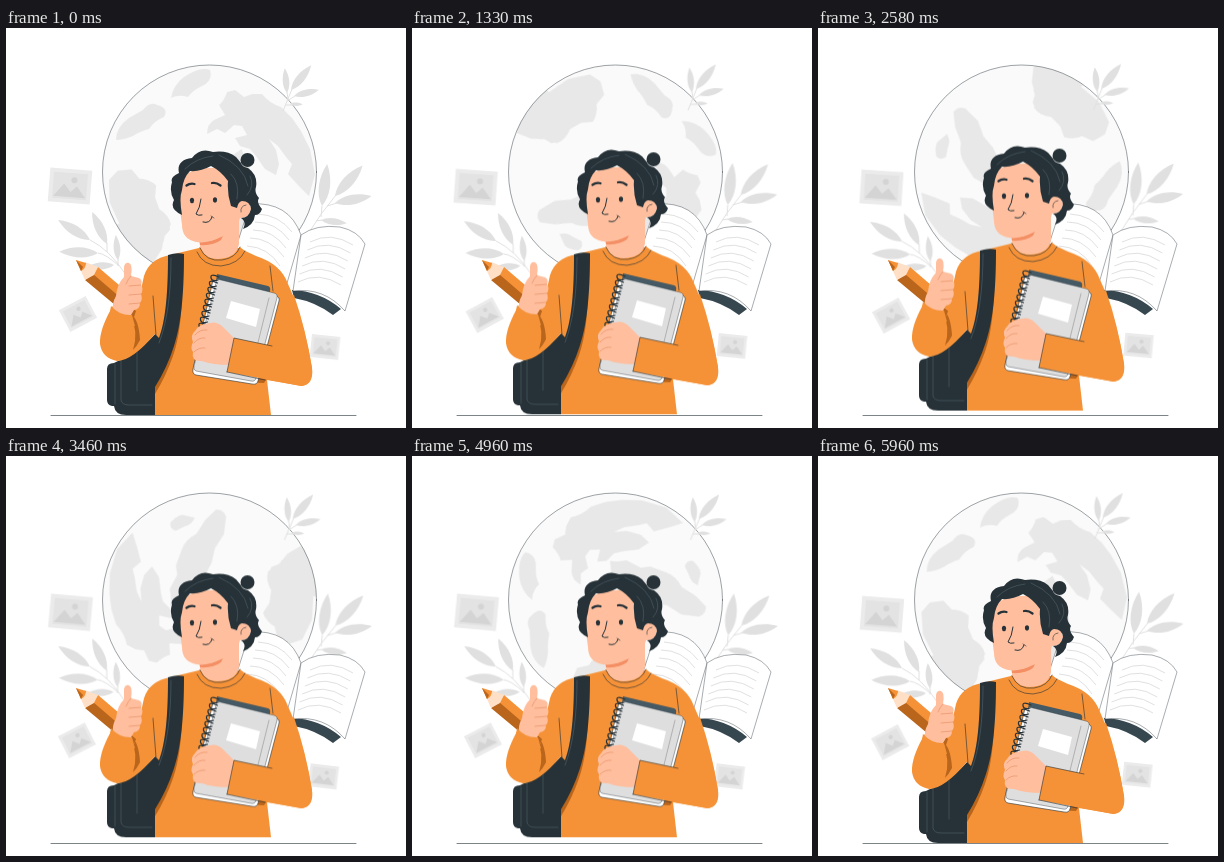
Animation, 400 px wide and 400 px high, one loop 6000 ms. Source, as an HTML page without scripts:

```html
<!DOCTYPE html>
<html lang="en">
<head>
<meta charset="utf-8">
<title>Student and globe</title>
<style>
html, body { margin: 0; width: 100%; height: 100%; overflow: hidden; background: #fff; }
svg { display: block; width: 100%; height: 100%; }
.bob { animation: bob .75s -.02s cubic-bezier(.37, 0, .63, 1) infinite alternate; }
.sway { transform-origin: 200px 200px; animation: sway .75s -.375s cubic-bezier(.37, 0, .63, 1) infinite alternate; }
.spin { transform-origin: 203.5px 144px; animation: spin 6s linear infinite; }
@keyframes bob { to { transform: translateY(-8px); } }
@keyframes sway { from { transform: rotate(-.75deg); } to { transform: rotate(.75deg); } }
@keyframes spin { to { transform: rotate(360deg); } }
.land { fill: #e8e8e8; }
.leaf { fill: #e0e0e0; }
.dark { fill: #263238; }
.knit { fill: #f59237; }
.shade { fill: #b9651c; }
.skin { fill: #ffbf9e; }
.line { fill: none; stroke: #263238; stroke-width: .6; stroke-linecap: round; stroke-linejoin: round; }
.pale { stroke: #52626a; }
.soft { fill: none; stroke: #e0e0e0; }
.text { fill: none; stroke: #d8d8d8; stroke-width: .8; }
</style>
</head>
<body>
<svg viewBox="0 0 400 400">
<defs>
  <path id="leaf" d="M0 0C-7-10-7-26 0-40C7-26 7-11 0 0Z"/>
  <g id="photo">
    <path fill="#ebebeb" d="M-21-17h42v34h-42z"/>
    <path fill="#e3e3e3" d="M-17-13h34v26h-34z"/>
    <path fill="#d4d4d4" d="M-16 11L-6-2L1 6L7 0L16 11Z"/>
    <circle cx="4" cy="-6" r="3" fill="#d4d4d4"/>
  </g>
  <path id="ring" d="M4 0Q-5-4-4 1Q-3 5 3 3"/>
  <clipPath id="disc"><circle cx="203.5" cy="144" r="107"/></clipPath>
</defs>

<!-- globe -->
<circle cx="203.5" cy="144" r="107" fill="#fafafa"/>
<g clip-path="url(#disc)">
  <g class="spin land">
    <path d="M110 112Q110 99 123 90L137 82Q144 73 151 77Q163 80 158 89Q148 93 143 101Q133 104 127 108Q118 112 110 112Z"/>
    <path d="M165 70Q167 57 178 49Q194 38 204 42Q207 53 196 58Q187 62 182 69Q173 66 165 70Z"/>
    <path d="M201 106Q201 96 208 92L219 87L213 77Q218 73 221 64L229 62L238 69L246 66L256 66Q263 75 275 79L286 90L295 103L304 121L309 146L303 168L292 157L282 146L286 136L280 129L272 118L263 111L270 122L273 136L270 147L259 141L250 128L244 121L234 118L229 110L241 107L236 98L228 97L219 105L211 101Z"/>
    <path d="M108 199Q115 192 124 197L136 193Q150 188 163 191L164 202L158 209L156 221L148 234L130 232L114 214Z"/>
    <g transform="rotate(-154.8 203.5 144)">
      <path d="M219 48Q213 60 217 67L216 80Q222 88 233 89L242 98L246 109Q256 112 264 108L275 113L287 106L291 94L281 74L262 58L250 46Z"/>
      <path d="M118 128Q116 115 122 112L129 106Q133 113 130 119L128 129Q122 133 118 128Z"/>
    </g>
    <path transform="rotate(-247.8 203.5 144)" d="M170 123Q176 118 180 110L195 104L200 96L214 88Q224 82 236 85L252 80L267 79Q273 84 270 91L257 103L241 108L229 117L212 124L199 136L185 133Z"/>
  </g>
</g>
<circle cx="203.5" cy="144" r="107" class="line" style="stroke-width:.45"/>

<!-- leaves and photos -->
<g class="sway">
  <g class="leaf">
    <path class="soft" d="M120 247Q103 221 84 212M113 238Q100 226 92 225M112 238V231M101 224V215"/>
    <use href="#leaf" transform="translate(84 212) rotate(-58) scale(.94)"/>
    <use href="#leaf" transform="translate(101 216) rotate(-25) scale(.88)"/>
    <use href="#leaf" transform="translate(112 232) rotate(-5) scale(.63)"/>
    <use href="#leaf" transform="translate(92 225) rotate(-88) scale(.97)"/>
    <use href="#leaf" transform="translate(108 237) rotate(-94) scale(.67)"/>
    <path class="soft" d="M302 206Q314 186 330 167M316 178L315 189M310 193L316 192M321 178L331 175"/>
    <use href="#leaf" transform="translate(316 178) rotate(7) scale(1.06)"/>
    <use href="#leaf" transform="translate(329 168) rotate(42) scale(1.03)"/>
    <use href="#leaf" transform="translate(329 175) rotate(79) scale(.93)"/>
    <use href="#leaf" transform="translate(315 192) rotate(97) scale(.65)"/>
    <path class="soft" d="M277 83L286 61M281 64L282 71M281 73L289 68M279 77H286"/>
    <use href="#leaf" transform="translate(281 65) rotate(-5) scale(.62)"/>
    <use href="#leaf" transform="translate(285 62) rotate(39) scale(.8)"/>
    <use href="#leaf" transform="translate(288 68) rotate(76) scale(.64)"/>
    <use href="#leaf" transform="translate(284 76) rotate(92) scale(.32)"/>
  </g>
  <use href="#photo" transform="translate(64 158) rotate(4.5)"/>
  <use href="#photo" transform="translate(72 286) rotate(-28) scale(.72)"/>
  <use href="#photo" transform="translate(319 319) rotate(6) scale(.68)"/>
</g>

<!-- open book -->
<path fill="#37474f" d="M286 262Q314 263 335 281L327 287Q310 274 288 270Z"/>
<g fill="#fff" stroke="#263238" stroke-width=".4">
  <path d="M244 176Q283 173 295 207L279 262Q262 232 226 232Z"/>
  <path d="M295 207Q310 196 334 199Q352 203 359 216L339 283Q318 259 287 263Z"/>
</g>
<g class="text">
  <path d="M252 186Q273 187 286 204M249 194Q270 194 283 212M247 202Q267 202 280 220M244 210Q264 210 278 229M241 218Q262 219 274 238"/>
  <path id="row" d="M304 214Q325 203 347 217"/>
  <use href="#row" x="-2.6" y="8"/>
  <use href="#row" x="-5.2" y="16"/>
  <use href="#row" x="-7.8" y="24"/>
  <use href="#row" x="-10.4" y="32"/>
  <use href="#row" x="-12" y="40"/>
</g>
<path class="line" d="M45 387.500H350"/>

<g class="bob">
  <!-- backpack -->
  <path class="dark" d="M112 333Q130 327 152 303V387H120Q109 387 108 378H106Q101 377 101 372V341Q101 335 108 335Z"/>
  <path class="line pale" d="M109 336V376M115 332V372Q116 377 123 377H146M131 323V363"/>

  <!-- sweater -->
  <path class="knit" d="M164 227Q143 231 138 248L132 275L108 276Q93 301 94 316Q96 330 111 333Q126 333 149 306V387H265L261 352L296 358Q308 356 306 340Q297 288 282 256Q275 236 250 228L233 220H193Z"/>
  <path class="shade" d="M124 285Q133 291 134 312Q131 318 127 322Q133 304 124 285Z"/>
  <path class="line" d="M147 268L150 307"/>
  <path class="shade" d="M176 260Q176 302 167 328Q160 348 149 366V350L165 315Z"/>
  <path class="dark" d="M162 227Q171 224 178 226C178 268 175 297 168 318Q161 340 149 359V306L153 310C160 292 162 262 162 227Z"/>
  <path class="line pale" d="M165 230Q165 285 153 315"/>

  <!-- neck and collar -->
  <path class="skin" d="M194 205L233 190V216Q231 230 212 231Q196 231 194 220Z"/>
  <path fill="#f48e64" d="M193 211Q205 218 219 204L215 212Q207 218 194 217Z"/>
  <path class="knit" d="M190 224L194 219Q200 233 216 231Q230 229 234 219L239 223Q234 236 215 238Q196 238 190 224Z"/>
  <path class="line" d="M191 224Q197 238 215 238Q233 236 239 223M194 220Q200 234 216 232Q230 230 234 219"/>

  <!-- head -->
  <path class="skin" d="M174 152Q186 136 225 141L234 171Q244 171 245 181Q244 190 234 190Q231 203 215 209Q201 216 190 214Q176 211 176 197L174 182Z"/>
  <path class="dark" d="M166 154Q164 149 173 145Q170 132 186 130Q194 119 207 124Q221 122 230 129L235 135Q236 139 242 140Q252 147 250 159Q248 164 253 170Q250 174 256 181Q254 187 249 187Q248 197 237 201Q241 194 235 190Q243 190 245 181Q244 173 236 173Q232 174 231 180L225 178Q221 166 222 153Q215 143 205 138Q194 144 184 143Q177 150 176 162Q173 170 176 187Q163 181 168 172Q163 164 166 154Z"/>
  <circle cx="241.500" cy="132" r="7" class="dark"/>
  <path class="line pale" d="M179 141Q190 130 207 128M213 127Q238 138 242 158M225 146Q234 155 231 171M244 148Q249 158 241 167"/>
  <path class="line" d="M240 177Q234 178 235 184"/>
  <g class="dark">
    <ellipse cx="186" cy="172.500" rx="2.1" ry="2.7"/>
    <ellipse cx="209" cy="172" rx="2.1" ry="2.7"/>
  </g>
  <path class="line" style="stroke-width:2.3" d="M180.500 157.500Q184 155 188.500 156M206 155Q210 154 214.500 157.500"/>
  <path class="line" style="stroke-width:1" d="M195 171Q194 180 190 186Q192 188 196 187M197 194Q204 196 206 189"/>
  <path class="line" d="M205 188L208 190"/>

  <!-- notebook -->
  <path fill="#455a64" d="M211 246L262 258Q265 259 264 263L249 345L198 337Z"/>
  <path class="shade" d="M186 341L250 350L265 320L277 325L258 355L234 354Z"/>
  <path fill="#fff" stroke="#263238" stroke-width=".6" d="M207 252L270 268Q274 269 273 273L252 353Q251 357 246 356L190 347Q186 346 187 341Z"/>
  <path fill="#dedede" stroke="#263238" stroke-width=".4" d="M211 251L268 265Q272 266 271 270L250 350Q249 354 245 353L190 343Q187 342 188 338Z"/>
  <path fill="#fff" d="M225 273L254 281L250 299L220 290Z"/>
  <path class="line" d="M263 270L244 347" style="stroke:#909090"/>
  <g class="line" style="stroke-width:1.2">
    <use href="#ring" x="209" y="249"/>
    <use href="#ring" x="207.500" y="255"/>
    <use href="#ring" x="206" y="261"/>
    <use href="#ring" x="204.500" y="267"/>
    <use href="#ring" x="203" y="273"/>
    <use href="#ring" x="201.500" y="279"/>
    <use href="#ring" x="200" y="285"/>
    <use href="#ring" x="198.500" y="291"/>
    <use href="#ring" x="197" y="297"/>
  </g>

  <!-- right arm -->
  <path class="skin" d="M189 303Q193 296 204 295Q211 293 217 299L230 312L224 337Q206 337 196 333Q185 334 187 324Q184 320 187 314Q184 307 189 303Z"/>
  <path class="line" style="stroke:#e58a61" d="M189 307Q194 301 201 302M188 315Q193 309 199 310M188 324Q193 319 199 320"/>
  <path class="knit" d="M228 310L267 318L275 266L288 267Q300 302 306 340Q307 357 295 358L221 344Z"/>
  <path class="line" d="M221 344L228 310L266 318M221 344L259 352M264 238L267 263"/>
</g>

<!-- pencil -->
<path class="knit" d="M92 239L134 275L127 291L80 252Z"/>
<path class="shade" d="M87 246L130 283L127 292L79 252Z"/>
<path fill="#ffdfc6" d="M79 234L92 239L88 247L79 252L74 241Z"/>
<path class="knit" d="M70 232L80 235Q80 240 75 243Z"/>
<path class="shade" d="M70 232L77 239L75 243Z"/>

<!-- raised hand -->
<g class="bob">
  <path class="skin" d="M118 239Q119 234 123 235Q127 237 125 248L133 250Q137 252 135 257Q138 261 135 266Q137 271 134 275Q134 281 128 282L125 287Q115 289 107 282Q106 275 110 268Q111 256 118 249Z"/>
  <path class="line" style="stroke:#e58a61" d="M125 248Q122 251 120 256M135 257L123 258M135 266L123 267M134 275L123 276"/>
  <path class="knit" d="M105 278Q114 288 126 287L129 298L101 300Z"/>
</g>
</svg>
</body>
</html>
```
